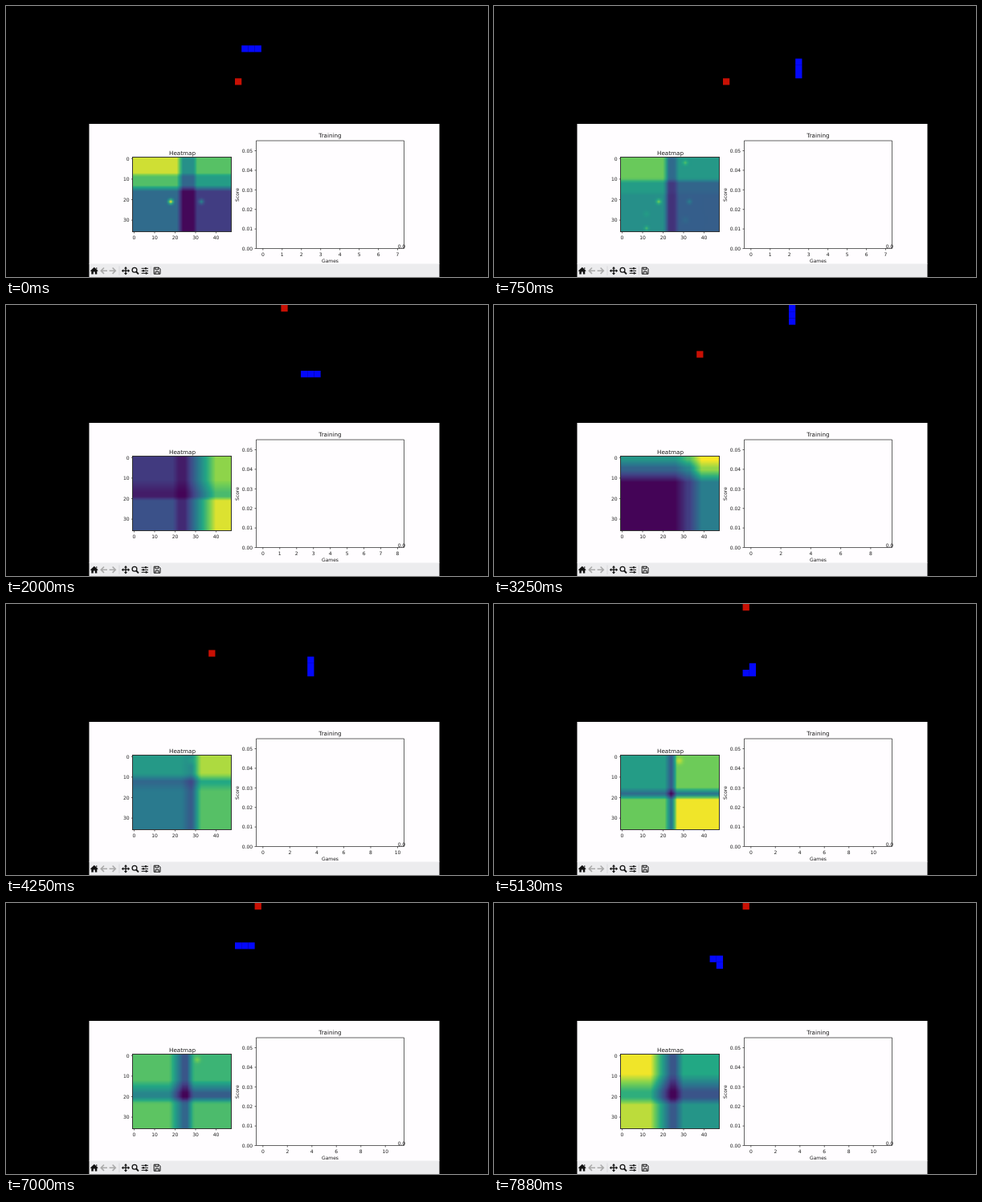
Animation, 600 px wide and 338 px high, one loop 8 s. Source, as an HTML page with a canvas:

```html
<!DOCTYPE html>
<html lang="en">
<head>
<meta charset="utf-8">
<title>Snake training</title>
<style>
html, body { margin: 0; width: 600px; height: 338px; overflow: hidden; background: #000; }
svg { position: absolute; left: 0; top: 0; }
text { font-family: "DejaVu Sans", sans-serif; font-size: 6px; fill: #1c1c1c; text-anchor: middle; }
.title { font-size: 7.2px; }
.end { text-anchor: end; }
.axis { fill: none; stroke: #222; stroke-width: .7; }
canvas { position: absolute; left: 158.3px; top: 189px; width: 122.2px; height: 92.3px; outline: .7px solid #333; }
</style>
</head>
<body>
<svg width="600" height="338">
  <rect width="600" height="338"/>
  <g id="game"></g>
  <path fill="#fffdff" d="M103.5 147H539.5V322H103.5z"/>
  <path fill="#ececee" d="M103.5 321.5H539.5V338H103.5z"/>
  <path class="axis" d="M311.5 168H495.5V302.5H311.5z"/>
  <text class="title" x="219.5" y="186">Heatmap</text>
  <text class="title" x="403.5" y="164">Training</text>
  <text x="403.5" y="319.7">Games</text>
  <text transform="translate(290.3 235.5) rotate(-90)">Score</text>
  <text x="492.4" y="302.3">0.0</text>
  <g id="scales"></g>
  <g id="games"></g>
  <g id="tools" fill="none" stroke="#111" stroke-width="1.3">
    <path fill="#111" stroke="none" d="M109.8 325.8L114.6 330.2 113.9 331 113.3 330.5V334.4H110.8V331.6H108.8V334.4H106.3V330.5L105.7 331 105 330.2zM112.2 326.3H113.3V328.5L112.2 327.5z"/>
    <path stroke="#aaa" stroke-width="1.6" d="M126 330.2H118.5M122 326.5L118.3 330.2 122 333.9M128.6 330.2H136.2M132.6 326.5L136.3 330.2 132.6 333.9"/>
    <path stroke="#d2d2d4" stroke-width=".7" d="M141 324.5V336M180.4 324.5V336"/>
    <path d="M145 330.2H153M149 326.2V334.2"/>
    <path fill="#111" stroke="none" d="M149 325L151 327.4H147zM149 335.4L151 333H147zM143.8 330.2L146.2 328.2V332.2zM154.2 330.2L151.8 328.2V332.2z"/>
    <circle cx="160" cy="329.3" r="2.9"/>
    <path stroke-width="1.8" d="M162.2 331.5L165 334.3"/>
    <path stroke-width="1" d="M168.6 327.3H177M168.6 330.3H177M168.6 333.3H177"/>
    <path stroke-width="1.6" d="M174 326V328.6M171 329V331.6M174.6 332V334.6"/>
    <path stroke-width="1" d="M184.2 326.2H190.2L192 328V334.2H184.2zM186 326.2V329H189.6V326.2M186 334.2V331.4H190.2V334.2"/>
  </g>
</svg>
<canvas id="heat" width="48" height="36"></canvas>
<script>
const LOOP = 8000, STEP = 125, CELL = 8.2, SPEED = 1.94;
const $ = id => document.getElementById(id);
const ctx = $('heat').getContext('2d'), img = ctx.createImageData(48, 36);
const mix = (a, b, k) => a + (b - a) * k;
const clamp = v => Math.max(0, Math.min(1, v));

// Each game: first step, game count, food cell, tail cell and the route from it
const games = [
  { from: 0, n: 7, food: [34, 11], tail: [35, 6], route: 'R10D12' },
  { from: 10, n: 8, food: [41, 0], tail: [39, 9], route: 'L3D1R10' },
  { from: 17, n: 9, food: [30, 7], tail: [35, 10], route: 'R9U10' },
  { from: 27, n: 10, food: [30, 7], tail: [35, 10], route: 'R2U3R8D10' },
  { from: 39, n: 11, food: [37, 0], tail: [33, 10], route: 'R5U4L3D4R4D2L5U6R4U1L6D3R1D1' }
];
const dirs = { R: [1, 0], L: [-1, 0], U: [0, -1], D: [0, 1] };
for (const g of games) {
  g.cells = [g.tail];
  for (const [, d, count] of g.route.matchAll(/([RLUD])(\d+)/g))
    for (let i = 0; i < count; i++) {
      const [x, y] = g.cells.at(-1);
      g.cells.push([x + dirs[d][0], y + dirs[d][1]]);
    }
}

// Heat states: three plateaus per axis (bounds x, y), nine levels v in percent, spots [x, y, gain, radius]
const states = [
  { at: 0, x: [21, 24, 29, 31], y: [7, 8.5, 13, 16], v: [93, 50, 72, 71, 33, 55, 35, 2, 18], spots: [[18, 21, 65, .8], [33, 21, 28, .8]] },
  { at: 11, x: [20, 22.3, 23, 25], y: [12, 14.5, 18, 20], v: [62, 22, 38, 42, 3, 14, 62, 25, 40], spots: [[31, 2, 32, .8], [12, 34, 36, .7], [12, 27, 10, 1], [31, 30, 7, 1.2]] },
  { at: 16, x: [19, 22, 25, 40], y: [11, 17, 19, 21], v: [17, 8, 83, 8, 1, 69, 25, 12, 95], spots: [] },
  { at: 26, x: [26, 32, 33, 39], y: [1, 5, 6, 12], v: [52, 70, 100, 32, 45, 84, 1, 18, 42], spots: [] },
  { at: 41, x: [21, 24, 24.5, 27], y: [15, 18, 18.5, 21], v: [55, 28, 77, 35, 1, 38, 76, 38, 98], spots: [[28, 2, 14, 1.2]] },
  { at: 49, x: [21, 24, 26, 28.5], y: [15, 19, 20, 22.5], v: [45, 27, 72, 28, 1, 33, 57, 38, 87], spots: [[31, 2, 26, 1]] },
  { at: 63, x: [14, 24, 26, 30], y: [9, 17.5, 20.5, 24], v: [98, 27, 60, 63, 1, 26, 90, 28, 52], spots: [] }
];
const viridis = [[68, 1, 84], [65, 68, 135], [42, 120, 142], [34, 168, 132], [122, 209, 81], [253, 231, 37]];

function ramp(p, [a, b, c, d], left, mid, right) {
  return p < b ? mix(left, mid, clamp((p - a) / (b - a))) : mix(mid, right, clamp((p - c) / (d - c)));
}

function drawHeat(step) {
  const i = Math.min(states.length - 2, states.findLastIndex(s => s.at <= step));
  const a = states[i], b = states[i + 1], k = (step - a.at) / (b.at - a.at);
  const blend = key => a[key].map((p, j) => mix(p, b[key][j], k));
  const xs = blend('x'), ys = blend('y'), v = blend('v');
  const spots = [[a, 1 - k], [b, k]].flatMap(([s, w]) => s.spots.map(([x, y, gain, r]) => [x, y, gain * w, r]));
  for (let y = 0, o = 0; y < 36; y++) {
    const row = [0, 1, 2].map(c => ramp(y, ys, v[c], v[c + 3], v[c + 6]));
    for (let x = 0; x < 48; x++, o += 4) {
      let level = ramp(x, xs, ...row);
      for (const [sx, sy, gain, r] of spots)
        level += gain * Math.exp(-((x - sx) ** 2 + (y - sy) ** 2) / (2 * r * r));
      const p = clamp(level / 100) * 5, j = Math.min(4, Math.floor(p));
      for (let c = 0; c < 3; c++) img.data[o + c] = mix(viridis[j][c], viridis[j + 1][c], p - j);
      img.data[o + 3] = 255;
    }
  }
  ctx.putImageData(img, 0, 0);
}

const square = ([x, y], color) =>
  `<rect x="${6.2 + CELL * x}" y="${CELL * y}" width="8.25" height="8.25" fill="${color}"/>`;
const xTick = (x, y, s) => `<path class="axis" d="M${x} ${y}v2"/><text x="${x}" y="${y + 9.2}">${s}</text>`;
const yTick = (x, y, s) => `<path class="axis" d="M${x} ${y}h-2"/><text class="end" x="${x - 4.3}" y="${y + 2.3}">${s}</text>`;

let scales = '';
for (let i = 0; i < 5; i++) scales += xTick(159.5 + 25.5 * i, 281.5, i * 10);
for (let i = 0; i < 4; i++) scales += yTick(158, 190.3 + 25.6 * i, i * 10);
for (let i = 0; i < 6; i++) scales += yTick(311.5, 302.5 - 24.4 * i, (i / 100).toFixed(2));
$('scales').innerHTML = scales;

function draw(step) {
  const g = games.findLast(g => g.from <= step);
  const head = Math.min(g.cells.length - 1, 2 + Math.round((step - g.from) * SPEED));
  $('game').innerHTML = square(g.food, '#c81004') +
    g.cells.slice(head - 2, head + 1).map(c => square(c, '#0408fa')).join('');
  let ticks = '';
  for (let i = 0; i <= g.n; i += g.n > 8 ? 2 : 1) ticks += xTick(319.8 + 167.7 * i / g.n, 302.5, i);
  $('games').innerHTML = ticks;
  drawHeat(step);
}

const start = performance.now();
let last = -1;
function tick() {
  // small lead keeps rounded timestamps on the right step
  const step = Math.floor(((performance.now() - start) % LOOP + 5) / STEP) % (LOOP / STEP);
  if (step !== last) draw(last = step);
  requestAnimationFrame(tick);
}
tick();
</script>
</body>
</html>
```
